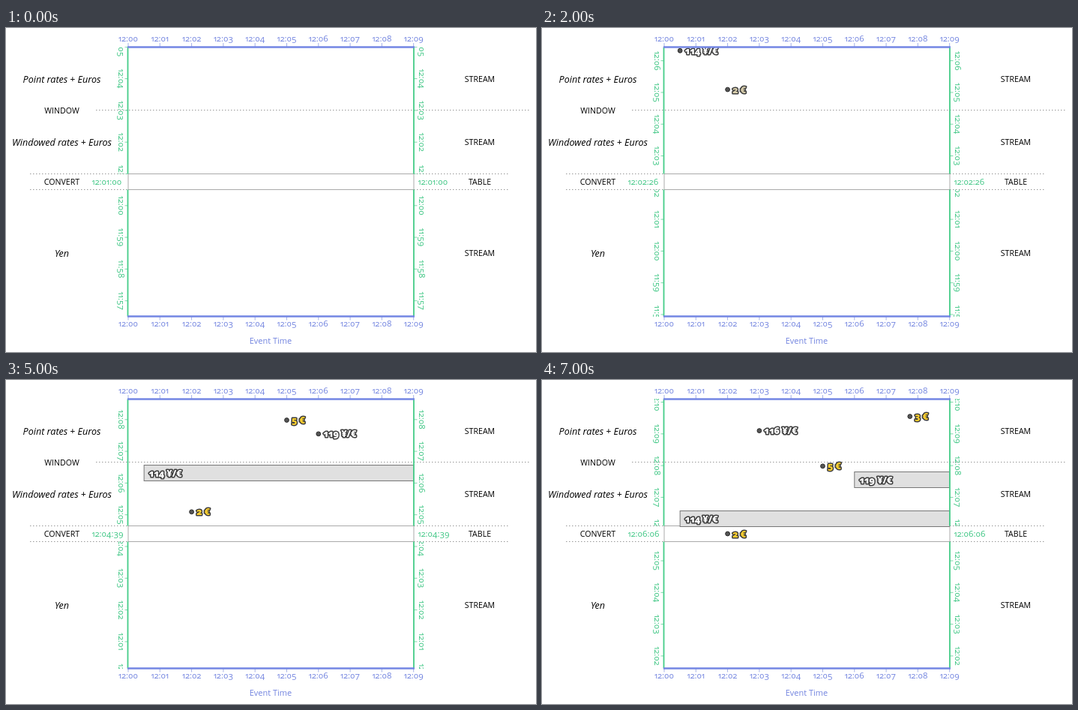
An HTML page that plays this animation: 707x432 px, repeating every 8000 ms.

```html
<!DOCTYPE html>
<html lang="en">
<head>
<meta charset="utf-8">
<style>
  html, body { margin: 0; width: 100%; height: 100%; overflow: hidden; background: #fff; }
  svg { display: block; width: 707px; height: 432px; }
  text { font: 10.6px "Open Sans", "Noto Sans", sans-serif; font-feature-settings: "onum", "pnum"; }
  .mid { text-anchor: middle; }
  .name { font-size: 12.6px; font-style: italic; }
  .blue { fill: #7183df; font-size: 11.4px; }
  .green { fill: #3ac581; font-size: 11.4px; }
  .title { font-size: 11px; }
  .value { font-size: 12.6px; font-weight: 800; stroke: #3d3d3d; stroke-width: 3px; stroke-linejoin: round; paint-order: stroke; }
  .dots { stroke: #999; stroke-dasharray: 1.5 2.5; }
  .bar { fill: #e0e0e0; stroke: #777; }
</style>
</head>
<body>
<svg viewBox="0 0 707 432">
  <defs>
    <clipPath id="axisClip"><path d="M0 25H707V194.5H0ZM0 215.5H707V385H0Z"/></clipPath>
    <clipPath id="plotClip"><path d="M163 25H544V385H163Z"/></clipPath>
    <clipPath id="windowClip"><path d="M163 110H544V385H163Z"/></clipPath>
  </defs>
  <g id="back"></g>
  <g id="moving"></g>
  <g id="front"></g>
</svg>
<script>
const LEFT = 163, RIGHT = 544, TOP = 25.5, BOTTOM = 384.5;
const WINDOW_Y = 109.5, TABLE_Y = 194.5, TABLE_H = 21;
const MINUTE = 42.3;
// Processing clock per step, in seconds after 12:00
const CLOCK = [60, 100, 146, 193, 233, 279, 326, 366];
// Event time in minutes, arrival in seconds after 12:00
const ITEMS = [
  { event: 0.5, arrival: 379, rate: 114 },
  { event: 2, arrival: 305.5, euros: 2 },
  { event: 6, arrival: 453, rate: 119 },
  { event: 5, arrival: 479, euros: 5 },
  { event: 3, arrival: 546, rate: 116 },
  { event: 7.75, arrival: 573, euros: 3 },
];

const layer = id => document.getElementById(id);
const text = (x, y, cls, s, extra = '') => `<text x="${x}" y="${y}" class="${cls}" ${extra}>${s}</text>`;
const line = (d, stroke, width = 1) => `<path d="${d}" fill="none" stroke="${stroke}" stroke-width="${width}"/>`;
const pad = n => String(n).padStart(2, '0');
const hourMinute = m => `${Math.floor((720 + m) / 60)}:${pad((720 + m) % 60)}`;
const eventX = m => LEFT + m * MINUTE;

function drawStatic() {
  const dotted = (x1, x2, y) => `<path class="dots" d="M${x1} ${y}H${x2}"/>`;
  let back = dotted(120, 698, WINDOW_Y) + dotted(32, 672, TABLE_Y) + dotted(32, 672, TABLE_Y + TABLE_H)
    + line(`M${LEFT} ${TABLE_Y}H${RIGHT}V${TABLE_Y + TABLE_H}H${LEFT}Z`, '#aaa')
    + text(353, 421, 'mid blue title', 'Event Time');
  const names = [['Point rates + Euros', 73], ['Windowed rates + Euros', 157], ['Yen', 305]];
  for (const [name, y] of names) {
    back += text(74.5, y, 'mid name', name) + text(632, y - 1, 'mid', 'STREAM');
  }
  back += text(74.5, 114, 'mid', 'WINDOW') + text(74.5, 209, 'mid', 'CONVERT') + text(632, 209, 'mid', 'TABLE');
  layer('back').innerHTML = back;

  let front = '';
  for (let m = 0; m <= 9; m++) {
    const x = eventX(m);
    front += line(`M${x} 20V${TOP}M${x} ${BOTTOM}V389.5`, '#a3afe8')
      + text(x, 18, 'mid blue', hourMinute(m)) + text(x, 398, 'mid blue', hourMinute(m));
  }
  for (const x of [LEFT - 0.5, RIGHT]) {
    front += line(`M${x} ${TOP}V${TABLE_Y}M${x} ${TABLE_Y + TABLE_H}V${BOTTOM}`, '#45cd88', 1.8);
  }
  front += line(`M${LEFT - 1} ${TOP}H${RIGHT + 1}M${LEFT - 1} ${BOTTOM}H${RIGHT + 1}`, '#7487e4', 2.4);
  layer('front').innerHTML = front;
}

function drawItem(item, clock, arrivalY) {
  const x = eventX(item.event);
  const y = item.rate ? arrivalY : Math.min(arrivalY, TABLE_Y + TABLE_H / 2);
  const label = item.rate ? `${item.rate} ¥/€` : `${item.euros} €`;
  const fill = item.rate ? '#fff' : clock < 279 ? '#d8ceac' : '#ffd02f';
  let out = '';
  if (item.rate) {
    out += `<g clip-path="url(#windowClip)"><rect class="bar" x="${x}" y="${Math.round(y) - 10.5}" width="${RIGHT - x}" height="21"/></g>`;
  }
  if (!item.rate || y < WINDOW_Y) {
    out += `<circle cx="${x}" cy="${y}" r="2.9" fill="#555" stroke="#2b2b2b"/>`;
  }
  return out + text(x + 6.4, y + 4.5, 'value', label, `fill="${fill}"`);
}

function drawStep(step) {
  const clock = CLOCK[step];
  const timeY = s => TABLE_Y - (s - clock) * MINUTE / 60;
  let axis = '';
  for (let m = -5; m <= 11; m++) {
    const y = timeY(m * 60);
    axis += line(`M${LEFT - 4.5} ${y}H${LEFT}M${RIGHT} ${y}H${RIGHT + 4.5}`, '#7cdaa9');
    for (const x of [149.5, 551]) {
      axis += text(0, 0, 'mid green', hourMinute(m), `transform="translate(${x} ${y}) rotate(90)"`);
    }
  }
  const now = `${hourMinute(Math.floor(clock / 60))}:${pad(clock % 60)}`;
  // The plot starts out empty
  const visible = step > 0 ? ITEMS : [];
  const items = visible.map(item => drawItem(item, clock, timeY(item.arrival))).join('');
  layer('moving').innerHTML = `<g clip-path="url(#axisClip)">${axis}</g>`
    + text(114.5, 208.5, 'green', now) + text(549.5, 208.5, 'green', now)
    + `<g clip-path="url(#plotClip)">${items}</g>`;
}

let shown = -1;
function tick() {
  const step = Math.floor(performance.now() / 1000) % CLOCK.length;
  if (step !== shown) drawStep(shown = step);
  requestAnimationFrame(tick);
}
drawStatic();
tick();
</script>
</body>
</html>
```
